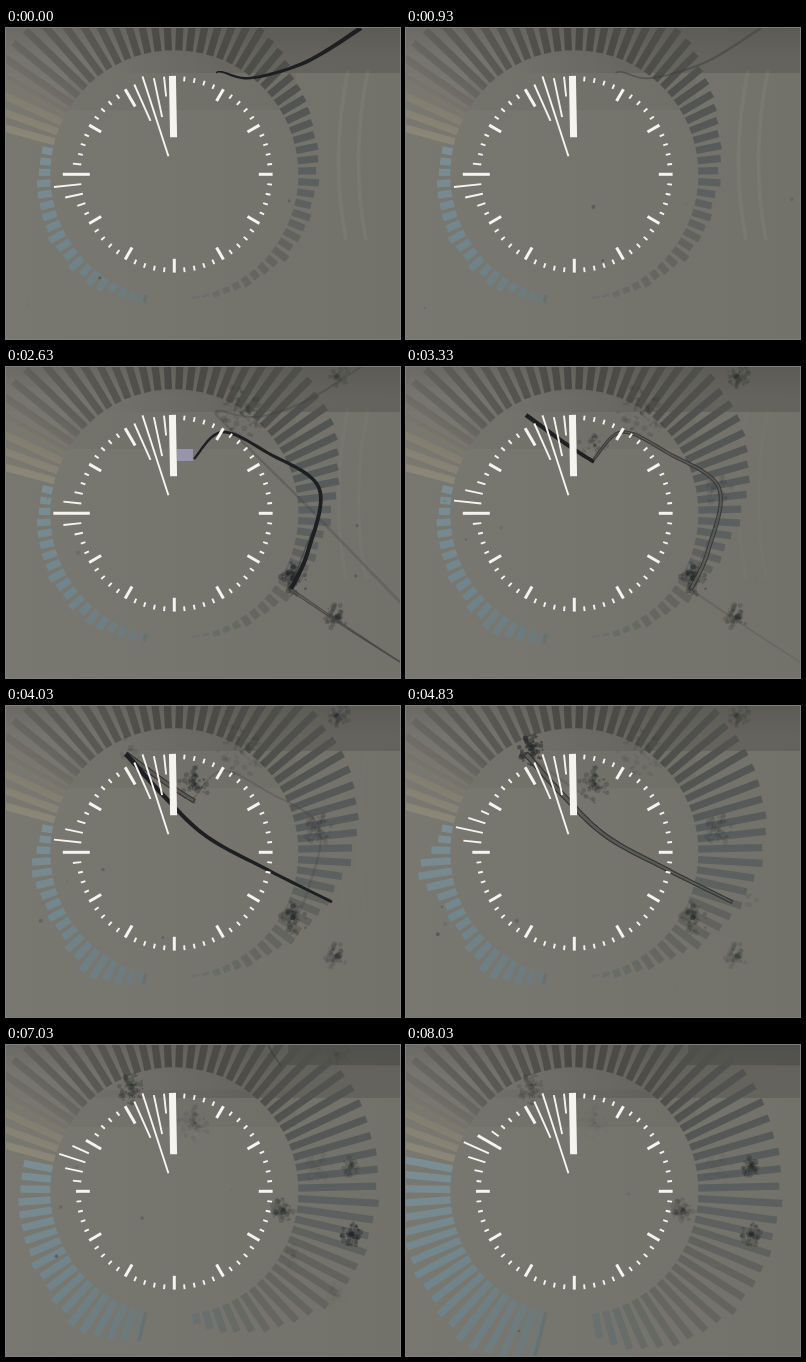
An HTML page with a canvas for the animation above (8.13 s loop, 394 px wide and 311 px high).

```html
<!DOCTYPE html>
<html lang="en">
<head>
<meta charset="utf-8">
<title>Ink clock</title>
<style>
html, body { margin: 0; width: 100%; height: 100%; overflow: hidden; background: #76756d; }
canvas { display: block; width: 394px; height: 311px; }
</style>
</head>
<body>
<canvas id="stage" width="394" height="311"></canvas>
<script>
const ctx = document.getElementById('stage').getContext('2d');
const W = 394, H = 311, CX = 168.3, CY = 146.3, LOOP = 8130;
const RAD = Math.PI / 180;
const clamp = (v, a = 0, b = 1) => Math.min(b, Math.max(a, v));
const lerp = (a, b, u) => a + (b - a) * u;
const ramp = (t, from, to) => clamp((t - from) / (to - from));
const bell = (x, width) => Math.exp(-((x / width) ** 2));

function seeded(seed) {
  return () => {
    seed = (seed * 1664525 + 1013904223) >>> 0;
    return seed / 4294967296;
  };
}

function gradient(g, stops) {
  stops.forEach(([at, color]) => g.addColorStop(at, color));
  return g;
}

function dot(x, y, r) {
  ctx.beginPath();
  ctx.arc(x, y, r, 0, 7);
  ctx.fill();
}

// Angles run clockwise from twelve o'clock, in degrees.
function ray(angle, from, to, width, color) {
  const s = Math.sin(angle * RAD), c = -Math.cos(angle * RAD);
  ctx.strokeStyle = color;
  ctx.lineWidth = width;
  ctx.beginPath();
  ctx.moveTo(CX + s * from, CY + c * from);
  ctx.lineTo(CX + s * to, CY + c * to);
  ctx.stroke();
}

// Ring of bars, open at the bottom.
const BARS = 71, FIRST = 194, GAP = 4.803;
const barColor = gradient(ctx.createConicGradient((FIRST - 90) * RAD, CX, CY), [
  [194, '#6c797b'], [235, '#70848b'], [282, '#7b8e94'], [283, '#8b8878'], [297, '#817e70'],
  [301, '#737169'], [316, '#5d5c57'], [360, '#494844'], [400, '#4e4e4a'], [450, '#5a5f60'],
  [480, '#63635e'], [505, '#66675f'], [530, '#687070']
].map(([angle, color]) => [(angle - FIRST) / 360, color]));

const noise = seeded(11);
const jitter = Array.from({ length: BARS }, () => (noise() - 0.5) * 5);

// Left side: short, with two swells, then a late surge.
function leftLength(angle, t) {
  const arch = 9 + 7 * Math.sin((angle - FIRST) / 89 * Math.PI);
  const low = 12 * bell(angle - 212, 16) * ramp(t, 2600, 4000);
  const high = 20 * bell(angle - 262, 9) * bell(t - 4900, 800);
  return arch + low + high + 38 * ramp(t, 6100, 8000);
}

// Right side: a front of long bars sweeps down from the top.
function rightLength(angle, t) {
  const v = (angle - 378) / 152, u = t / LOOP;
  const front = 0.1 + 0.88 * u;
  return 20 * (1 - v ** 4) + (45 + 20 * u) / (1 + Math.exp((v - front) * 10));
}

function barLength(angle, t) {
  if (angle < 283) return leftLength(angle, t);
  return angle < 378 ? 85 : rightLength(angle, t);
}

function drawBars(t) {
  for (let i = 0; i < BARS; i++) {
    const angle = FIRST + i * GAP;
    ray(angle, 124, 124 + Math.max(2, barLength(angle, t) + jitter[i]), 7.3, barColor);
  }
}

const wash = gradient(ctx.createLinearGradient(0, 0, W, 0), [[0, '#787770'], [1, '#73726a']]);
const bandShade = gradient(ctx.createLinearGradient(70, 0, 250, 0),
  [[0, 'rgba(70,70,66,.04)'], [1, 'rgba(70,70,66,.34)']]);
const topShade = gradient(ctx.createLinearGradient(0, 0, 0, 30),
  [[0, 'rgba(60,60,56,.2)'], [1, 'rgba(60,60,56,0)']]);

function drawBackground(t) {
  const rect = (color, ...box) => {
    ctx.fillStyle = color;
    ctx.fillRect(...box);
  };
  rect(wash, 0, 0, W, H);
  rect(bandShade, 0, 0, W, t < 5000 ? 45 : 53);
  rect(topShade, 0, 0, W, 30);
  rect('rgba(60,60,56,.07)', 62, 45, 228, 37);
  if (t > 5500) rect('rgba(60,60,57,.35)', t < 7000 ? 350 : 282, 0, 112, t < 7000 ? 16 : 20);
  ctx.strokeStyle = `rgba(235,235,225,${0.04 * ramp(t, 4200, 1200)})`;
  ctx.lineWidth = 4;
  for (const x of [342, 362]) {
    ctx.beginPath();
    ctx.moveTo(x, 42);
    ctx.quadraticCurveTo(x - 18, 130, x - 2, 212);
    ctx.stroke();
  }
}

// Catmull-Rom curve through a few points.
function spline(points) {
  const out = [], n = points.length, at = i => points[clamp(i, 0, n - 1)];
  for (let i = 0; i < n - 1; i++) {
    const [a, b, c, d] = [at(i - 1), at(i), at(i + 1), at(i + 2)];
    for (let k = 0; k < 12; k++) {
      const u = k / 12;
      out.push([0, 1].map(j => b[j] + 0.5 * u * (c[j] - a[j] +
        u * (2 * a[j] - 5 * b[j] + 4 * c[j] - d[j] + u * (3 * (b[j] - c[j]) + d[j] - a[j])))));
    }
  }
  return out.concat([points[n - 1]]);
}

const ink = (born, draw, from, to, ...points) => ({ born, draw, from, to, pts: spline(points) });
const strokes = [
  ink(-350, 300, 1, 5, [210, 45], [216, 44], [245, 50], [300, 34], [355, 0]),
  ink(1050, 250, 3, 5.5, [355, 0], [300, 34], [250, 50], [211, 44], [225, 63], [300, 138], [394, 235]),
  ink(1500, 100, 0.8, 3, [306, 165], [296, 190], [284, 222]),
  ink(1550, 200, 5, 1, [284, 222], [340, 260], [394, 295]),
  ink(2330, 250, 2.5, 5, [188, 92], [216, 65], [262, 86], [313, 121], [302, 184], [285, 222]),
  ink(3080, 200, 4, 5, [188, 95], [160, 77], [120, 48]),
  ink(3900, 120, 5.5, 3, [120, 48], [156, 88], [200, 130], [262, 164], [326, 196]),
  ink(5830, 150, 3, 2, [260, -4], [267, 9], [275, 21])
];

function ribbon({ pts, from, to }, part, scale) {
  const left = [], right = [], end = pts.length - 1;
  for (let i = 0; i <= Math.max(1, Math.round(end * part)); i++) {
    const p = pts[Math.max(0, i - 1)], q = pts[Math.min(end, i + 1)];
    const dx = q[0] - p[0], dy = q[1] - p[1];
    const k = lerp(from, to, i / end) * scale / 2 / (Math.hypot(dx, dy) || 1);
    left.push([pts[i][0] - dy * k, pts[i][1] + dx * k]);
    right.unshift([pts[i][0] + dy * k, pts[i][1] - dx * k]);
  }
  ctx.beginPath();
  left.concat(right).forEach(p => ctx.lineTo(...p));
  ctx.closePath();
}

// Ink is black at first, then a hollow tube, then a thin fading trace.
function drawStrokes(t) {
  for (const s of strokes) {
    const age = t - s.born;
    if (age < 0 || age > 2100) continue;
    const thin = ramp(age, 950, 1150);
    ribbon(s, clamp(age / s.draw), lerp(0.9, 0.3, thin));
    ctx.globalAlpha = lerp(1, 0.35, thin) * ramp(age, 2100, 1300);
    ctx.fillStyle = age < 600 ? '#1d1f22' : '#5a5a56';
    ctx.fill();
    if (age >= 600) {
      ctx.strokeStyle = '#323333';
      ctx.lineWidth = 1.1;
      ctx.stroke();
    }
    ctx.globalAlpha = 1;
  }
}

// Blots grow where the ink has landed, then dry out.
const blots = [
  [235, 46, 26, 1300, 0.18],
  [287, 211, 17, 1650, 0.38],
  [330, 250, 12, 1750, 0.22],
  [332, 8, 13, 2100, 0.2],
  [188, 79, 17, 2900, 0.3],
  [125, 44, 14, 3850, 0.48],
  [312, 125, 16, 2850, 0.15],
  [345, 190, 11, 4700, 0.5],
  [277, 165, 12, 5000, 0.25],
  [344, 122, 9, 6500, 0.25]
].map(([x, y, size, born, strength], i) => {
  const r = seeded(71 + i * 97);
  const dots = Array.from({ length: 55 }, () => {
    const a = r() * 2 * Math.PI, d = r() ** 0.8 * size;
    return [x + Math.cos(a) * d * 0.9, y + Math.sin(a) * d * 1.1, 0.8 + r() * 2.2];
  });
  return { born, strength, dots };
});

function drawBlots(t) {
  for (const { born, strength, dots } of blots) {
    const level = ramp(t, born, born + 700) * ramp(t, born + 5500, born + 1000);
    ctx.fillStyle = `rgba(38,40,42,${strength * level})`;
    const count = Math.ceil(dots.length * ramp(t, born, born + 900));
    for (const d of dots.slice(0, count)) dot(...d);
  }
}

const r = seeded(5);
const specks = Array.from({ length: 30 }, (_, i) => ({
  time: i / 30 * LOOP, x: r() * W, y: 100 + r() * 205, size: 1 + r() * 1.2, drift: (r() - 0.5) / 80
}));

function drawSpecks(t) {
  for (const { time, x, y, size, drift } of specks) {
    const dt = t - time;
    ctx.fillStyle = `rgba(50,52,52,${0.45 * clamp(1 - Math.abs(dt) / 700)})`;
    dot(x + dt * drift, y + dt * 0.004, size);
  }
}

// Ticks stretch around the current second and minute.
function drawClock(t) {
  const white = '#f6f4ee', minute = 57;
  const second = Math.floor(44.4 + t * 0.00058);
  for (let i = 0; i < 60; i++) {
    const big = i % 5 === 0;
    const sGap = Math.abs(i - second), mGap = Math.abs(i - minute);
    let inner = big ? 84.5 : 93.5, outer = 98.3;
    if (sGap < 3) outer = 121 - 9.5 * sGap;
    if (mGap < 3) inner = Math.min(inner, 98 - 79 / 2 ** mGap);
    if (mGap === 0) outer = 103;
    ray(i * 6, inner, outer, big ? 3 : 1.9, white);
  }
  ray(-1.1, 37, 98.5, 7, white);
}

// Steps of 100 ms, with a longer hold near the start.
function step(t) {
  if (t < 100) return 0;
  if (t < 230) return 100;
  if (t < 430) return 230;
  return Math.floor((t - 30) / 100) * 100 + 30;
}

function draw(t) {
  drawBackground(t);
  drawBars(t);
  drawBlots(t);
  drawStrokes(t);
  drawSpecks(t);
  if (t >= 2430 && t < 2830) {
    ctx.fillStyle = '#9894ac';
    ctx.fillRect(171, 82, 16, 12);
  }
  drawClock(t);
}

const start = performance.now();
function tick() {
  draw(step((performance.now() - start) % LOOP));
  requestAnimationFrame(tick);
}
tick();
</script>
</body>
</html>
```
